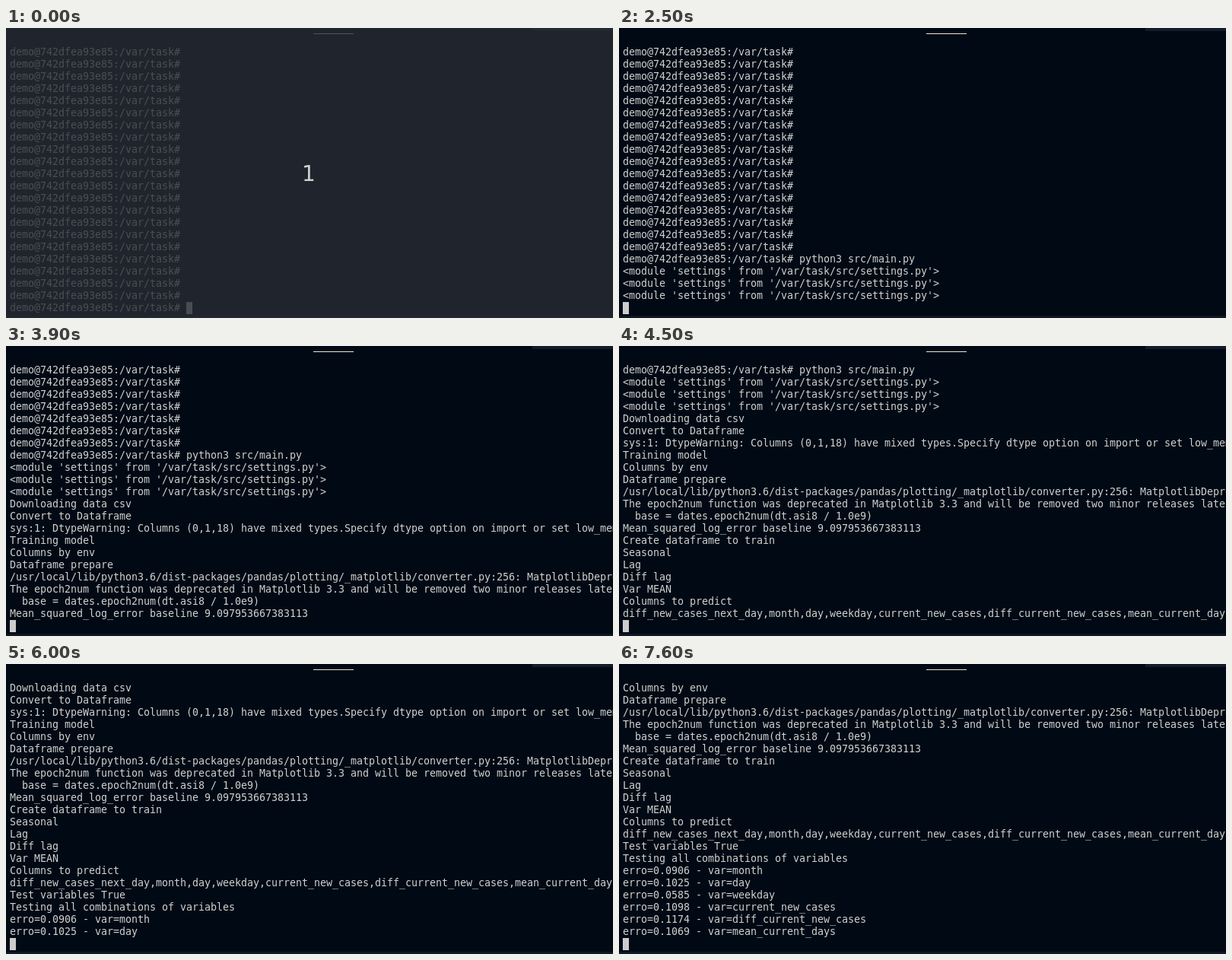
Recreate the animation shown at these times as an HTML page. Size 798x381 px, loop 8 s.

```html
<!DOCTYPE html>
<html lang="en">
<head>
<meta charset="utf-8">
<title>Terminal session</title>
<style>
html, body { margin: 0; height: 100%; overflow: hidden; background: #010a14; }
svg { display: block; }
#rows text { font: 13.333px "DejaVu Sans Mono", monospace; fill: #d0d0d0; white-space: pre; }
#count text { font: 28px "DejaVu Sans", sans-serif; fill: #d0d0d0; text-anchor: middle; }
</style>
</head>
<body>
<svg width="798" height="381" viewBox="0 0 798 381">
  <rect width="798" height="381" fill="#010a14"/>
  <rect x="692" width="106" height="4" fill="#141c2b"/>
  <rect y="378" width="798" height="3" fill="#0f1724"/>
  <rect x="404" y="7" width="53" height="1" fill="#e6e6e6"/>
  <g id="rows"></g>
  <rect id="cursor" y="360" width="8" height="16" fill="#cccccc"/>
  <g id="count">
    <rect width="798" height="381" fill="#282c34" fill-opacity=".8"/>
    <text x="398" y="201">1</text>
  </g>
</svg>
<script>
const LOOP = 8000, ROWS = 22, COLS = 120, CELL = 8, LINE = 16, LEFT = 5;
const COUNT_END = 500, TYPED = 1000, ENTER = 1400;
const prompt = "demo@742dfea93e85:/var/task# ";
const command = "python3 src/main.py ";
const moduleLine = "<module 'settings' from '/var/task/src/settings.py'>";

// Output blocks: time of arrival, then the lines printed
const output = [
  [2500, moduleLine, moduleLine, moduleLine],
  [2600, "Downloading data csv", "Convert to Dataframe",
    "sys:1: DtypeWarning: Columns (0,1,18) have mixed types.Specify dtype option on import or set low_memory=False."],
  [3000, "Training model", "Columns by env", "Dataframe prepare"],
  [3200, "/usr/local/lib/python3.6/dist-packages/pandas/plotting/_matplotlib/converter.py:256: MatplotlibDeprecationWarning:",
    "The epoch2num function was deprecated in Matplotlib 3.3 and will be removed two minor releases later.",
    "  base = dates.epoch2num(dt.asi8 / 1.0e9)"],
  [3900, "Mean_squared_log_error baseline 9.097953667383113"],
  [4200, "Create dataframe to train"],
  [4500, "Seasonal", "Lag", "Diff lag", "Var MEAN", "Columns to predict",
    "diff_new_cases_next_day,month,day,weekday,current_new_cases,diff_current_new_cases,mean_current_days"],
  [5200, "Test variables True", "Testing all combinations of variables", "erro=0.0906 - var=month"],
  [6000, "erro=0.1025 - var=day"],
  [6400, "erro=0.0585 - var=weekday"],
  [6800, "erro=0.1098 - var=current_new_cases"],
  [7200, "erro=0.1174 - var=diff_current_new_cases"],
  [7600, "erro=0.1069 - var=mean_current_days"]
];

const $ = id => document.getElementById(id);
const cellX = col => LEFT + CELL * col;

// Every character sits on the terminal's cell grid
const grid = Array.from({ length: COLS }, (_, col) => cellX(col)).join(" ");
const rows = Array.from({ length: ROWS }, (_, i) => {
  const row = document.createElementNS("http://www.w3.org/2000/svg", "text");
  row.setAttribute("x", grid);
  row.setAttribute("y", 36 + i * LINE);
  return $("rows").appendChild(row);
});

function screen(t) {
  const lines = Array(ROWS - 1).fill(prompt);
  lines.push(t < TYPED ? prompt : prompt + command);
  if (t >= ENTER) {
    for (const [time, ...text] of output) if (t >= time) lines.push(...text);
    lines.push("");
  }
  return lines.slice(-ROWS);
}

function draw(t) {
  const lines = screen(t);
  rows.forEach((row, i) => {
    if (row.textContent !== lines[i]) row.textContent = lines[i];
  });
  $("cursor").setAttribute("x", cellX(lines[ROWS - 1].length));
  $("count").style.display = t < COUNT_END ? "" : "none";
}

const start = performance.now();
function tick() {
  draw((performance.now() - start) % LOOP);
  requestAnimationFrame(tick);
}
tick();
</script>
</body>
</html>
```
